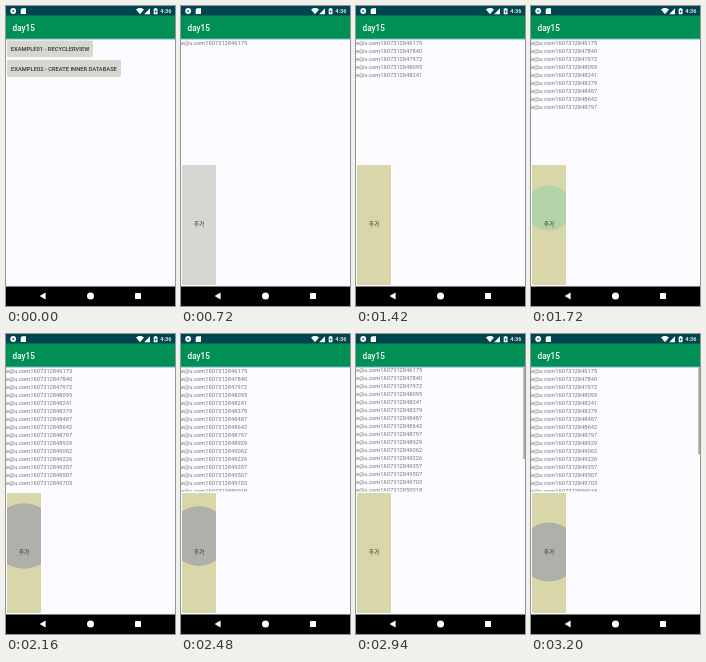
These frames come from a looping animation (169x300 px, 3220 ms). An HTML page:

```html
<!DOCTYPE html>
<html lang="ko">
<head>
<meta charset="utf-8">
<style>
html, body { margin: 0; width: 100%; height: 100%; overflow: hidden; background: #fcfbff; }
svg { display: block; width: 100%; height: 100%; }
text { font: 5.75px Roboto, "Noto Sans CJK KR", "Noto Sans CJK", sans-serif; }
.label { font-weight: 500; fill: #333; text-anchor: middle; }
.row { fill: #777; }
.clock { font-size: 5.6px; font-weight: 500; fill: #fff; }
.title { font-size: 8.2px; font-weight: 500; fill: #fff; }
</style>
</head>
<body>
<svg viewBox="0 0 169 300">
  <defs>
    <clipPath id="listClip"><rect y="33" width="169" height="124.5"/></clipPath>
    <clipPath id="addClip"><rect x="1" y="159" width="34" height="120" rx="1"/></clipPath>
    <clipPath id="openClip"><rect x="1" y="54" width="114" height="17" rx="1"/></clipPath>
  </defs>
  <rect width="169" height="300" fill="#fcfbff"/>

  <g id="menu">
    <rect x="1" y="34.5" width="86" height="16.5" rx="1" fill="#d7d6d1"/>
    <rect x="1" y="54" width="114" height="17" rx="1" fill="#d7d6d1"/>
    <circle id="openRipple" cx="45" cy="62.5" fill="#bdbdb8" clip-path="url(#openClip)"/>
    <text class="label" x="44" y="45">EXAMPLE01 - RECYCLERVIEW</text>
    <text class="label" x="58" y="64.5">EXAMPLE02 - CREATE INNER DATABASE</text>
  </g>

  <g id="screen">
    <rect y="33" width="169" height="248" fill="#fcfbff"/>
    <g clip-path="url(#listClip)">
      <path id="glow" d="M0 141Q70 131 169 152V158H0Z" fill="#d4d0fa"/>
      <g id="list"></g>
      <rect id="thumb" x="167.3" width="1.7" fill="#a8a8a8"/>
    </g>
    <rect id="add" x="1" y="159" width="34" height="120" rx="1"/>
    <g clip-path="url(#addClip)"><circle id="ripple" cx="18"/></g>
    <text class="label" x="18" y="220">추가</text>
  </g>

  <rect width="169" height="10" fill="#00454f"/>
  <rect y="9.5" width="169" height="23.5" fill="#009055"/>
  <rect y="32.6" width="169" height="1" fill="#8dbbd0"/>
  <text class="title" x="6.5" y="24.6">day15</text>
  <g fill="#fff">
    <circle cx="7.2" cy="5" r="2.9"/>
    <circle cx="7.2" cy="5" r="1.2" fill="#6f9aa0"/>
    <path d="M16 2.2h4v5.8h-5.3V3.6z"/>
    <path d="M130 3.4q4-2.6 8 0l-4 4.8z"/>
    <path d="M144 2.2v6h-5.8z"/>
    <path d="M147.7 2.8h1.1v-.8h1.6v.8h1.1v5.4h-3.8z"/>
    <path d="M149.8 3.6l-1.2 2.2h.8v1.6l1.3-2.3h-.9z" fill="#00454f"/>
  </g>
  <text class="clock" x="154.3" y="7.2">4:36</text>

  <rect y="280.5" width="169" height="19.5"/>
  <g fill="#fff">
    <path d="M33.6 290l6-3.5v7z"/>
    <circle cx="84.5" cy="290" r="3.5"/>
    <rect x="129" y="287" width="6" height="6" rx=".4"/>
  </g>
</svg>
<script>
const LOOP = 3220, ROW = 8, TOP = 33, VIEW = 124;
const $ = id => document.getElementById(id);
const set = (id, attrs) => {
  for (const k in attrs) $(id).setAttribute(k, attrs[k]);
};
const clamp = (v, a = 0, b = 1) => Math.min(b, Math.max(a, v));
const progress = (t, a, b) => clamp((t - a) / (b - a));
const smooth = p => p * p * (3 - 2 * p);

// Clock offsets at which rows were inserted; playback runs at double speed.
const offsets = [0, 1665, 1797, 1920, 2066, 2204, 2312, 2467, 2622, 2754, 2887,
  3051, 3182, 3332, 3528, 3843, 4044, 4199, 4335, 4488, 4596, 5642];
const times = offsets.map(o => 357 + o / 2);
const rows = offsets.map((o, i) => {
  const el = document.createElementNS("http://www.w3.org/2000/svg", "text");
  el.setAttribute("class", "row");
  el.setAttribute("y", 39 + i * ROW);
  el.textContent = "e@u.com" + (1607312846175 + o);
  $("list").append(el);
  return el;
});

const scrollKeys = [[2665, 0], [2705, 44], [2740, 32], [2960, 0]];
function scrollAt(t) {
  let y = 0;
  for (let i = 1; i < scrollKeys.length; i++) {
    const [a, from] = scrollKeys[i - 1], [b, to] = scrollKeys[i];
    if (t >= a) y = from + (to - from) * smooth(progress(t, a, b));
  }
  return y;
}

function drawMenu(t) {
  const age = t - 220;
  set("openRipple", {
    r: clamp(age * 0.5, 0, 80),
    opacity: 1 - progress(age, 100, 200)
  });
  const p = progress(t, 420, 620);
  set("screen", {
    opacity: progress(t, 420, 530),
    transform: `translate(0 ${24 * (1 - p) ** 3})`
  });
}

function drawList(t) {
  const count = times.filter(x => x <= t).length;
  const y = scrollAt(t), content = Math.max(VIEW, count * ROW);
  rows.forEach((el, i) => el.setAttribute("visibility", i < count ? "inherit" : "hidden"));
  set("list", { transform: `translate(0 ${-y})` });
  set("glow", { opacity: progress(t, 2695, 2725) * (1 - progress(t, 2745, 2840)) });
  set("thumb", {
    y: TOP + y / content * VIEW,
    height: VIEW * VIEW / content,
    opacity: t >= 2665 ? 1 : 0
  });
}

function drawButton(t) {
  set("add", { fill: t < 900 ? "#d7d6d3" : "#d9d6aa" });
  const press = times.slice(1).map(x => x - 38).filter(x => x <= t).pop();
  const age = press === undefined ? 0 : t - press;
  set("ripple", {
    cy: t < 2900 ? 202 : 218,
    r: Math.min(1.2 * age, 18 + 0.19 * age, 62),
    fill: t < 1970 ? "#b4d2a8" : "#b0b0aa",
    opacity: 1 - progress(age, 85, 145)
  });
}

const start = performance.now();
function frame() {
  const t = (performance.now() - start) % LOOP;
  drawMenu(t);
  drawList(t);
  drawButton(t);
  requestAnimationFrame(frame);
}
frame();
</script>
</body>
</html>
```
